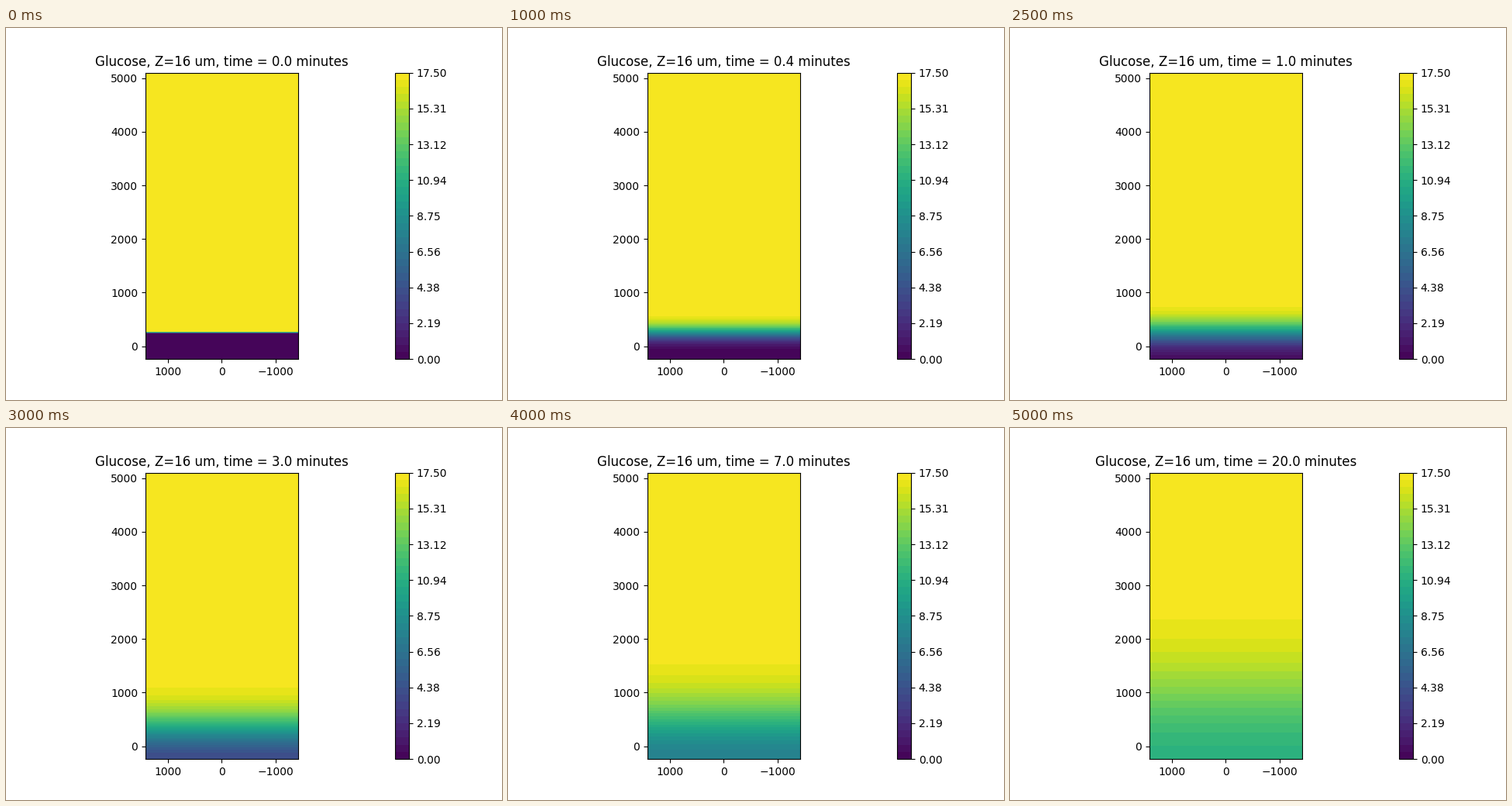
These frames come from a looping animation (640x480 px, 5.25 s). A matplotlib script:

```python
import matplotlib.pyplot as plt
import numpy as np
from matplotlib.animation import FuncAnimation

# Glucose diffusing into an empty layer at the bottom of a voxel grid
STEP = 32.0          # voxel size, um
DIFFUSION = 30000.0  # um^2 / min
DT = 0.01            # min
PEAK = 17.5
LEVELS = np.linspace(0, PEAK, 41)

x = np.array([-1424.0, 1424.0])
y = np.arange(-240.0, 5105.0, STEP)
start = np.where(y < 256, 0.0, PEAK)

times = [k / 10 for k in range(11)] + list(range(2, 11)) + [20]


def implicit_step(n):
    """Matrix of one backward Euler step with closed ends."""
    r = DIFFUSION * DT / STEP**2
    lap = np.eye(n, k=1) + np.eye(n, k=-1) - 2 * np.eye(n)
    lap[0, 0] = lap[-1, -1] = -1
    return np.linalg.inv(np.eye(n) - r * lap)


def solve():
    one = implicit_step(len(y))
    fields = []
    for t in times:
        c = np.linalg.matrix_power(one, round(t / DT)) @ start
        fields.append(np.clip(c, 0, PEAK - 1e-6))
    return fields


fields = solve()
fig, ax = plt.subplots(figsize=(6.4, 4.8), dpi=100)


def draw_field(c):
    return ax.contourf(x, y, np.column_stack([c, c]), levels=LEVELS,
                       cmap="viridis")


fig.colorbar(draw_field(fields[0]), ax=ax, ticks=LEVELS[::5])
ax.set_aspect("equal", adjustable="box", anchor="C")


def update(i):
    for old in list(ax.collections):
        old.remove()
    draw_field(fields[i])
    ax.set_xlim(x[1], x[0])
    ax.set_ylim(y[0], y[-1])
    ax.set_xticks([1000, 0, -1000])
    ax.set_yticks(range(0, 5001, 1000))
    ax.set_title(f"Glucose, Z=16 um, time = {times[i]:.1f} minutes")
    return ax.collections


anim = FuncAnimation(fig, update, frames=len(times), interval=250,
                     repeat=True, repeat_delay=0, blit=False)
plt.show()
```
